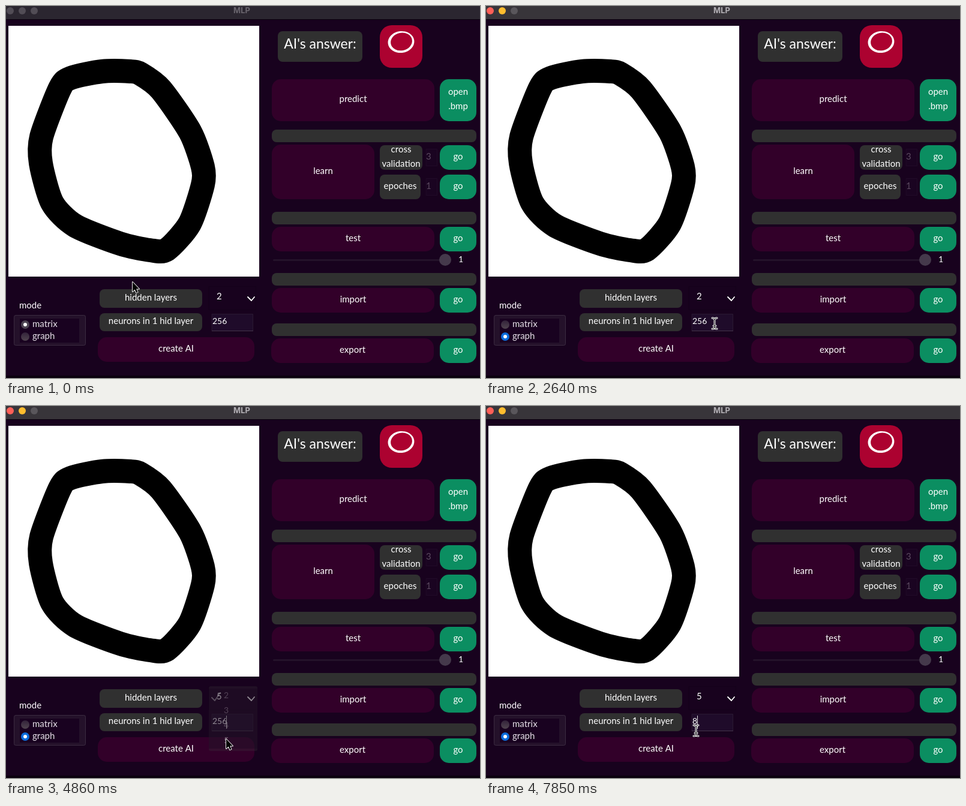
These frames come from a looping animation (790x620 px, 8 s). An HTML page with a canvas:

```html
<!DOCTYPE html>
<html lang="en">
<head>
<meta charset="utf-8">
<title>MLP</title>
<style>
  html, body { margin: 0; width: 100%; height: 100%; overflow: hidden; background: #18021e; }
  canvas { display: block; }
</style>
</head>
<body>
<canvas id="stage" width="790" height="620"></canvas>
<script>
const ctx = document.getElementById('stage').getContext('2d');
const LOOP = 8000, TICK = 147;
const PURPLE = '#320029', GREY = '#303030', GREEN = '#0b8e61', NIGHT = '#18021e';
const RADIUS = { [PURPLE]: 15, [GREEN]: 15, [GREY]: 8 };

// Event times in ms
const ACTIVATE = 2050, OPEN = 3080, PICK = 4860, CLOSED = 5000, SELECT = 5450, TYPE = 7400;

// Pointer moves: first step, last step, destination
const REST = [211, 460];
const moves = [
  [150, 1170, 34, 547],   // to the mode box
  [1310, 1460, 31, 550],  // onto "graph"
  [2500, 2640, 381, 529], // across the number field
  [2790, 2930, 404, 490], // to the drop-down
  [3230, 3520, 394, 495],
  [3960, 4550, 367, 555], // down the list to "5"
  [5000, 5300, 373, 529], // back to the field
  [7850, 7850, 350, 541]
];

const arrow = new Path2D('M0 0V16L3.7 12.6 6.2 18 8.6 17 6.2 11.6H11Z');
const beam = new Path2D('M-4-9Q0-9 0-6V6Q0 9-4 9M4-9Q0-9 0-6M0 6Q0 9 4 9M-2 4H2');
const check = new Path2D('M343 486L348 491 357 478');
const chevron = new Path2D('M403 485L409 491 414 485');
const brush = smoothLoop([
  [207, 109], [160, 109], [108, 120], [90, 137], [59, 218], [58, 262], [77, 328],
  [115, 366], [190, 396], [240, 407], [268, 406], [306, 363], [328, 298], [328, 268],
  [307, 210], [258, 139], [224, 113]
]);

// Closed Catmull-Rom curve through the given points
function smoothLoop(points) {
  const path = new Path2D();
  const at = i => points[(i + points.length) % points.length];
  path.moveTo(...at(0));
  points.forEach((p, i) => {
    const before = at(i - 1), q = at(i + 1), after = at(i + 2);
    path.bezierCurveTo(
      p[0] + (q[0] - before[0]) / 8, p[1] + (q[1] - before[1]) / 8,
      q[0] - (after[0] - p[0]) / 8, q[1] - (after[1] - p[1]) / 8, ...q);
  });
  path.closePath();
  return path;
}

function pointerAt(t) {
  let [x, y] = REST;
  for (const [start, end, toX, toY] of moves) {
    if (t < start) break;
    const steps = Math.round((end - start) / TICK) + 1;
    const p = Math.min(1, (Math.floor((t - start) / TICK + .1) + 1) / steps);
    const eased = p * p * (3 - 2 * p);
    x += (toX - x) * eased;
    y += (toY - y) * eased;
  }
  return [x, y];
}

function box(x, y, w, h, fill, radius = 0, border) {
  ctx.beginPath();
  ctx.roundRect(x, y, w, h, radius);
  ctx.fillStyle = fill;
  ctx.fill();
  if (border) {
    ctx.beginPath();
    ctx.roundRect(x + .5, y + .5, w - 1, h - 1, radius);
    ctx.lineWidth = 1;
    ctx.strokeStyle = border;
    ctx.stroke();
  }
}

function text(str, x, y, { size = 15, align = 'left', fill = '#fff', font = 'Lato', weight = 400 } = {}) {
  ctx.font = `${weight} ${size}px ${font}, sans-serif`;
  ctx.textAlign = align;
  ctx.fillStyle = fill;
  ctx.fillText(str, x, y);
}

// Rounded tile with its label lines centred
function tile(x, y, w, h, color, label = '', size = 15) {
  box(x, y, w, h, color, RADIUS[color]);
  const lines = label.split('\n');
  lines.forEach((str, i) =>
    text(str, x + w / 2, y + h / 2 + 3 + 24 * (i - (lines.length - 1) / 2), { size, align: 'center' }));
}

function disc(x, y, r, fill) {
  ctx.beginPath();
  ctx.arc(x, y, r, 0, 2 * Math.PI);
  ctx.fillStyle = fill;
  ctx.fill();
}

function line(path, color, width) {
  ctx.lineWidth = width;
  ctx.strokeStyle = color;
  ctx.stroke(path);
}

function titleBar(active) {
  box(0, 0, 790, 22, active ? '#38353a' : '#2b2630');
  box(0, 22, 790, 1, '#09010c');
  const lights = active ? ['#ff5f57', '#febc2e', '#59565b'] : Array(3).fill('#514c55');
  lights.forEach((color, i) => disc(7 + 20 * i, 8, 6, color));
  text('MLP', 393, 12, { size: 13, align: 'center', fill: active ? '#b4b1b6' : '#6b666f', font: 'Inter', weight: 700 });
}

function drawing() {
  box(4, 33, 418, 418, '#fff');
  line(brush, '#000', 40);
}

function answer() {
  tile(453, 42, 141, 51, GREY, "AI's answer:", 23);
  box(623, 32, 71, 71, '#ac0230', 20);
  ctx.beginPath();
  ctx.ellipse(658.5, 60, 22, 18, -.1, 0, 7);
  ctx.ellipse(659, 59.4, 18, 14.8, -.2, 0, 7);
  ctx.fillStyle = '#fff';
  ctx.fill('evenodd');
}

function rightPanel() {
  tile(443, 122, 271, 70, PURPLE, 'predict');
  tile(723, 122, 61, 70, GREEN, 'open\n.bmp');
  for (const y of [206, 343, 445, 529]) tile(443, y, 341, 21, GREY);
  for (const y of [232, 281, 368, 470, 554]) tile(723, y, 61, 41, GREEN, 'go');

  tile(443, 231, 171, 91, PURPLE, 'learn');
  tile(623, 232, 71, 41, GREY, 'cross\nvalidation');
  tile(623, 281, 68, 41, GREY, 'epoches');
  ['3', '1'].forEach((digit, i) => {
    const y = 238 + 49 * i;
    box(700, y, 19, 29, '#1a0421', 0, '#210b28');
    text(digit, 700, y + 18, { fill: '#5b4a60' });
  });

  tile(443, 368, 271, 41, PURPLE, 'test');
  tile(443, 470, 271, 41, PURPLE, 'import');
  tile(442, 554, 271, 41, PURPLE, 'export');
  box(445, 422, 290, 3, '#24122a', 1.5);
  disc(732, 423, 10, '#45394b');
  text('1', 758, 427, { size: 14, align: 'center' });
}

function radio(y, label, on, active) {
  let fill = on && active ? '#0a6cdc' : '#4d4352';
  if (!on) {
    fill = ctx.createLinearGradient(0, y - 7, 0, y + 7);
    fill.addColorStop(0, '#33233a');
    fill.addColorStop(1, '#50444f');
  }
  disc(32, y, 7, fill);
  if (on) disc(32, y, 3, '#fff');
  text(label, 44, y + 3.5, { fill: '#e6e0e8' });
}

function modePanel(active) {
  text('mode', 22, 504);
  box(13, 515, 120, 51, '#24112a', 3, '#3b2b40');
  box(23, 521, 99, 40, '#190220');
  radio(531, 'matrix', !active, active);
  radio(551, 'graph', active, active);
}

function settings(t) {
  tile(156, 472, 171, 31, GREY, 'hidden layers');
  tile(156, 512, 171, 30, GREY, 'neurons in 1 hid layer');
  tile(153, 552, 261, 41, PURPLE, 'create AI');

  box(338, 467, 79, 40, NIGHT, 0, '#14011a');
  text(t < PICK ? '2' : '5', 351, 489);
  line(chevron, '#fff', 1.8);

  const typed = t >= TYPE, selected = t >= SELECT && !typed;
  box(343, 513, 69, 29, '#1f0b2a', 0, '#2a1a32');
  box(343, 541, 69, 1, '#44364a');
  if (selected) box(344, 516, 23, 24, '#31517f');
  text(typed ? '8' : '256', 344, 530, { size: 14 });
  if (t >= PICK && !selected) box(typed ? 352 : 367, 516, 1, 22, '#ddd');
}

function popup(t, pointerY) {
  if (t < OPEN || t >= CLOSED) return;
  ctx.save();
  if (t >= PICK) ctx.globalAlpha = .3;
  box(338, 467, 81, 108, '#38343a', 3);
  box(338, 471, 81, 100, '#15011c');
  line(check, '#ddd', 2);
  const hover = Math.floor((pointerY - 471) / 25);
  for (let i = 0; i < 4; i++) {
    const style = i === hover ? { weight: 700 } : { fill: '#cfc8d2' };
    text(String(i + 2), 363, 487 + 25 * i, { size: 14, ...style });
  }
  ctx.restore();
}

function cursor(t, x, y) {
  const menuOpen = t >= OPEN && t < CLOSED;
  const overField = !menuOpen && x > 343 && x < 412 && y > 513 && y < 542;
  ctx.save();
  ctx.translate(x, y);
  if (overField) {
    line(beam, '#fff', 3);
    line(beam, '#111', 1);
  } else {
    line(arrow, '#fff', 1.8);
    ctx.fillStyle = '#000';
    ctx.fill(arrow);
  }
  ctx.restore();
}

function frame() {
  const t = (performance.now() - begin) % LOOP;
  const active = t >= ACTIVATE;
  const [x, y] = pointerAt(t);
  box(0, 0, 790, 620, NIGHT);
  box(0, 616, 790, 4, '#0b010e');
  titleBar(active);
  drawing();
  answer();
  rightPanel();
  modePanel(active);
  settings(t);
  popup(t, y);
  cursor(t, x, y);
  requestAnimationFrame(frame);
}

ctx.lineJoin = ctx.lineCap = 'round';
const begin = performance.now();
frame();
</script>
</body>
</html>
```
